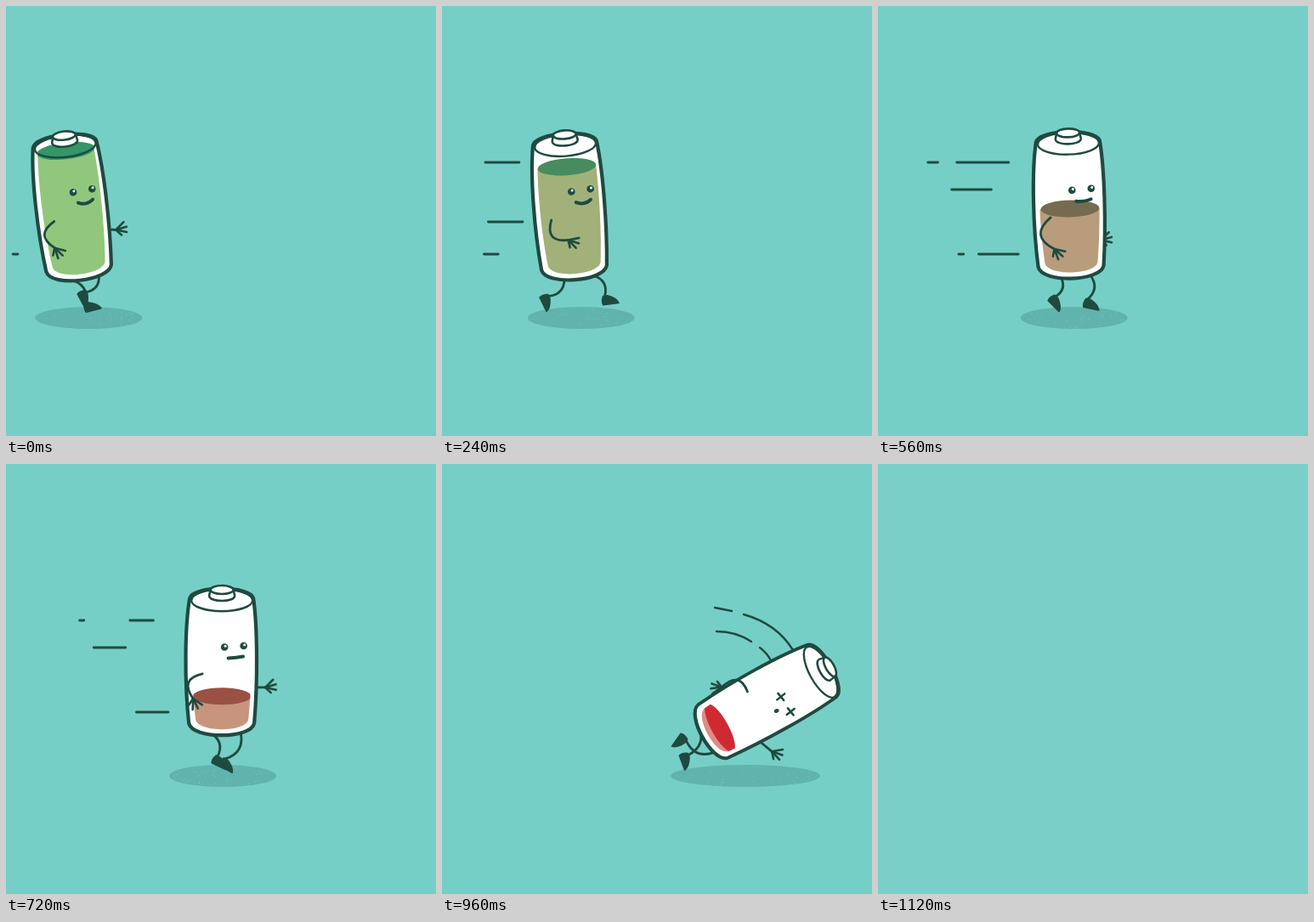
Recreate the animation shown at these times as an HTML page with a canvas. Size 506x506 px, loop 1.52 s.

```html
<!DOCTYPE html>
<html>
<head>
<meta charset="utf-8">
<style>
  html, body { margin: 0; width: 100%; height: 100%; overflow: hidden; background: #76cfc6; }
  canvas { display: block; }
</style>
</head>
<body>
<canvas id="stage" width="506" height="506"></canvas>
<script>
const ctx = document.getElementById('stage').getContext('2d');
const STEP = 80, LOOP = 1520, EMPTY = 14;
const TRIP = 9, LAND = 12; // steps between which the battery falls
const INK = '#1f4a40';

const rad = deg => deg * Math.PI / 180;
const clamp = (v, lo, hi) => Math.max(lo, Math.min(hi, v));
const mix = (a, b, p) => Array.isArray(a) ? a.map((v, i) => mix(v, b[i], p)) : a + (b - a) * p;

// Ends of the limbs on the body: x, y, angle.
const START = { arm: [-26, 45, 61], palm: [48, 32, 1], footA: [4, 114, -8], footB: [5, 101, 68] };
const STRIDE = { arm: [-5, 39, 33], palm: [20, 32, 0], footA: [-33, 103, 68], footB: [33, 108, -3] };
const TIRED = { arm: [-34, 43, 75], palm: [51, 30, -5], footA: [-5, 111, 25], footB: [4, 114, 30] };
const FALLEN = { arm: [-44, 38, 124], palm: [54, 23, -31], footA: [10, 111, 9], footB: [-6, 105, 64] };
const gait = [[0, START], [2, STRIDE], [5, STRIDE], [TRIP, TIRED], [LAND, FALLEN]];

const lights = [[0, [145, 199, 124]], [5, [171, 162, 119]], [LAND, [220, 140, 132]]];
const darks = [[0, [53, 149, 103]], [5, [83, 133, 90]], [LAND, [207, 42, 49]]];

// Each streak grows and shrinks over its life while its centre follows a path.
const streaks = [
  { y: 184, born: 3, dies: 10, size: 12, path: s => 40 + 12.3 * (s - 5) },
  { y: 184, born: 1.2, dies: 10.2, size: 68, path: s => 62 + 8 * (s - 2) + .85 * (s - 2) ** 2 },
  { y: 216, born: 4, dies: 11, size: 48, path: s => 106 + (s - 5) ** 2 },
  { y: 254, born: .5, dies: 6.5, size: 42, path: s => 58 + 16.7 * (s - 2) },
  { y: 292, born: -1, dies: 8, size: 17, path: s => 11 + 18 * s - .8 * s * s },
  { y: 292, born: 4, dies: 11, size: 48, path: s => 125 + 5 * (s - 5) + 1.7 * (s - 5) ** 2 }
];

// Neighbouring keys around a step and the share of the way between them.
function between(keys, step) {
  const i = clamp(keys.findIndex(k => k[0] >= step) - 1, 0, keys.length - 2);
  const [[s0, a], [s1, b]] = keys.slice(step > LAND ? -2 : i);
  return [a, b, clamp((step - s0) / (s1 - s0), 0, 1)];
}

const colorAt = (keys, step) => `rgb(${mix(...between(keys, step)).map(Math.round)})`;

function limbsAt(step) {
  const [a, b, p] = between(gait, step), out = {};
  for (const name in a) out[name] = mix(a[name], b[name], p);
  // hands swing through a low arc
  for (const name of ['arm', 'palm'])
    out[name][1] += .35 * Math.abs(b[name][0] - a[name][0]) * Math.sin(Math.PI * p);
  return out;
}

function stroke(d, width) {
  ctx.strokeStyle = INK;
  ctx.lineWidth = width;
  ctx.stroke(new Path2D(d));
}

function fill(d, color) {
  ctx.fillStyle = color;
  ctx.fill(new Path2D(d));
}

function oval(x, y, rx, ry, color, line) {
  ctx.beginPath();
  ctx.ellipse(x, y, rx, ry, 0, 0, 7);
  if (color) { ctx.fillStyle = color; ctx.fill(); }
  if (line) { ctx.strokeStyle = INK; ctx.lineWidth = line; ctx.stroke(); }
}

function placed(x, y, angle, draw) {
  ctx.save();
  ctx.translate(x, y);
  ctx.rotate(rad(angle));
  draw();
  ctx.restore();
}

// A curved limb whose joint bends out to one side, with something at its end.
function limb(x0, y0, [x, y, angle], bend, tip) {
  const dx = x - x0, dy = y - y0;
  stroke(`M${x0} ${y0}Q${x0 + dx / 2 + bend * dy} ${y0 + dy / 2 - bend * dx} ${x} ${y}`, 2.8);
  placed(x, y, angle, tip);
}

function hand() {
  [-40, -11, 17, 48].forEach((angle, i) =>
    placed(0, 0, angle, () => stroke(`M0 0H${13 - (i > 2) * 4}`, 2.6)));
}

function shoe() {
  const d = 'M-2 0Q-5 6-3 10L15 10Q13 4 3 0Z';
  fill(d, INK);
  stroke(d, 1.8);
}

function shadow(x, rx, step) {
  oval(x, 367, rx, 13, '#60b4ad');
  let seed = step * 97 + 13;
  const rand = () => (seed = (seed * 16807) % 2147483647) / 2147483647;
  rand();
  ctx.fillStyle = 'rgba(140,215,207,.7)';
  for (let i = 0; i < 30; i++) {
    const angle = rand() * 7, r = Math.sqrt(rand()) * .95;
    ctx.fillRect(x + Math.cos(angle) * r * rx, 367 + Math.sin(angle) * r * 13, 1, 1);
  }
}

function can(step) {
  const level = Math.min(63, -67 + 4 * step + .88 * step * step);
  const shell = 'M-38-75C-44-40-44 25-39 72C-35 91 34 91 38 72C42 25 42-40 37-75C33-90-34-90-38-75Z';
  fill(shell, '#fff');

  ctx.save();
  ctx.clip(new Path2D('M-32-80C-37-40-37 20-31 68C-27 83 27 83 31 68C36 20 36-40 32-80Z'));
  ctx.fillStyle = colorAt(lights, step);
  ctx.fillRect(-45, level, 90, 160);
  oval(0, level, 34.5, 10, colorAt(darks, step));
  ctx.restore();

  stroke(shell, 4.2);
  oval(0, -72.5, 36, 12.8, null, 2.4);
  const cap = 'M-13.5-85L-15-78C-15-70 15-70 15-78L13.5-85Z';
  fill(cap, '#fff');
  stroke(cap, 2.6);
  oval(0, -85, 13.5, 5, '#fff', 2.6);
}

function face(step) {
  const dead = step > 10;
  for (const [x, y] of [[3, -17.5], [25.5, -19]]) {
    if (dead) {
      placed(x, y, -55, () => stroke('M-4-4L4 4M4-4L-4 4', 2.6));
    } else {
      oval(x, y, 4.3, 4.3, INK);
      oval(x + 1, y - 1.3, 1.5, 1.5, '#fff');
    }
  }
  const smile = clamp((TRIP - step) * .9, 0, 5);
  if (dead) oval(16, -5, 2.4, 3, INK);
  else stroke(`M7.5-4.5Q17 ${smile - 5} 25-6.5`, 4);
}

function speedLines(step) {
  for (const { y, born, dies, size, path } of streaks) {
    if (step <= born || step >= dies) continue;
    const half = size / 2 * Math.sin(Math.PI * (step - born) / (dies - born)), x = path(step);
    stroke(`M${x - half} ${y}H${x + half}`, 2.8);
  }
}

function fallLines() {
  stroke('M321 169L341 173M355 177Q394 188 413 219', 2.4);
  stroke('M323 197Q346 197 364 209M374 216Q382 222 387 231', 2.4);
}

function render(step) {
  ctx.fillStyle = step < EMPTY ? '#76cfc6' : '#7acfc8';
  ctx.fillRect(0, 0, 506, 506);
  if (step >= EMPTY) return;

  const run = Math.min(step, TRIP);
  const fall = Math.min(1.4, (Math.max(0, step - TRIP) / (LAND - TRIP)) ** 1.6);
  const lean = -6.5 * (1 - run / TRIP);
  const x = 78 + 26.5 * run - .77 * run * run + 128 * fall;
  const y = 237 - .45 * run + 8 * Math.exp(-(((run - 5) / 1.2) ** 2)) + 47 * fall;

  ctx.lineCap = ctx.lineJoin = 'round';
  shadow(x - 2.8 * lean + 1 - 26 * fall, 63 + 25 * fall, step);
  speedLines(step);
  if (step >= LAND) fallLines();

  const { arm, palm, footA, footB } = limbsAt(step);
  placed(x, y, lean + 61 * fall, () => {
    limb(-13, 84, footA, .45, shoe);
    limb(22, 83, footB, .45, shoe);
    limb(36, 30, palm, 0, hand);
    ctx.scale(1 - .07 * fall, 1);
    can(step);
    face(step);
    limb(-23, 14, arm, -.75, hand);
  });
}

const start = performance.now();
function tick() {
  const time = (performance.now() - start) % LOOP;
  render(Math.min(EMPTY, Math.floor(time / STEP)));
  requestAnimationFrame(tick);
}
tick();
</script>
</body>
</html>
```
